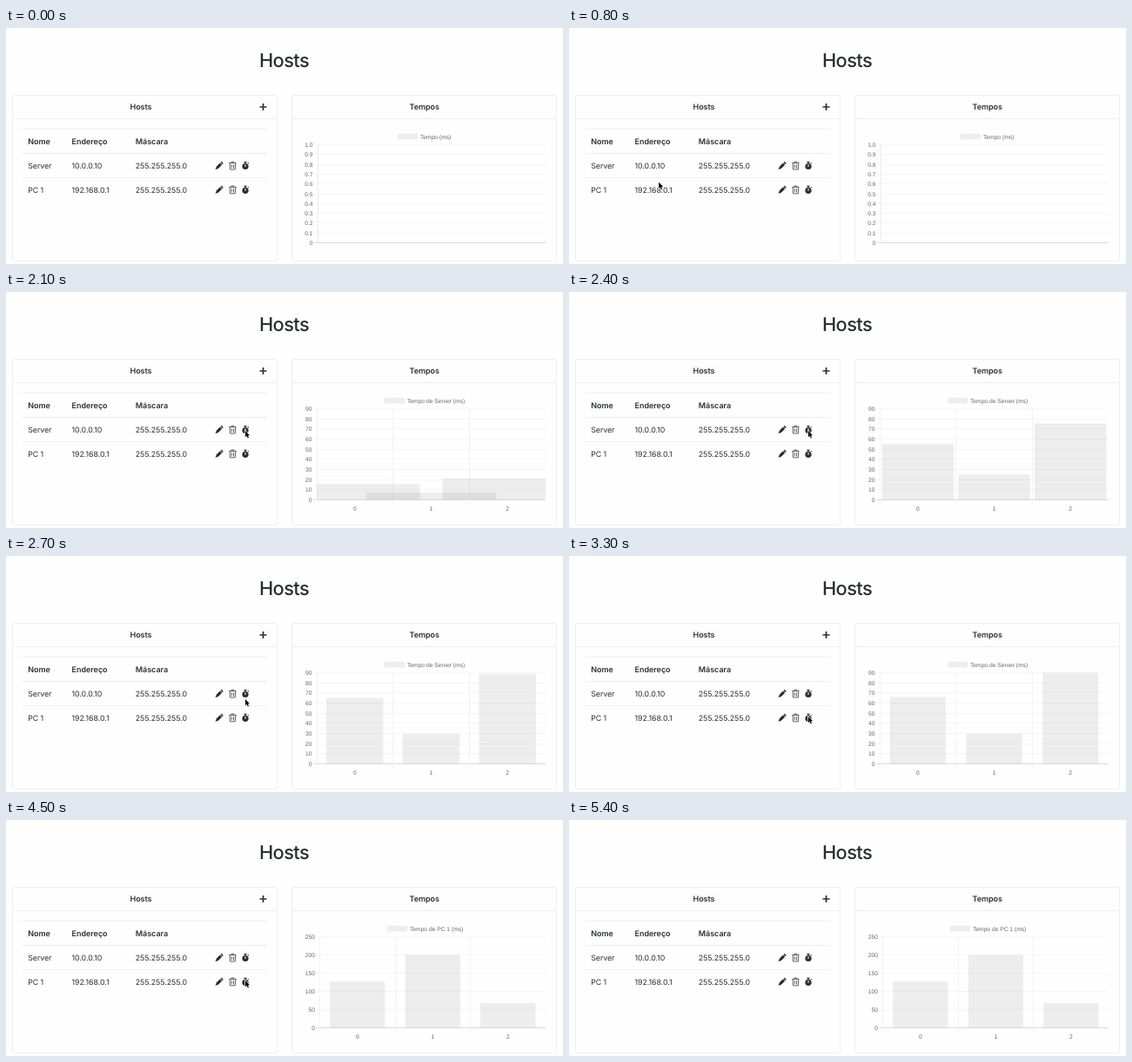
Animation of 640 by 272 pixels, one loop 5700 ms. Source, as an HTML page with a canvas:

```html
<!DOCTYPE html>
<html lang="pt">
<head>
<meta charset="utf-8">
<title>Hosts</title>
<style>
html, body { margin: 0; width: 100%; height: 100%; overflow: hidden; background: #fefefe; }
svg, canvas { position: absolute; left: 0; top: 0; width: 640px; height: 272px; }
text { font: 8.8px Inter, sans-serif; letter-spacing: -.04px; fill: #2b2f33; text-rendering: geometricPrecision; }
.b { font-size: 9px; font-weight: 600; letter-spacing: -.03px; }
.mid { text-anchor: middle; }
.h1 { font: 500 21.8px Inter, sans-serif; letter-spacing: -.6px; }
.line { fill: none; stroke: #eee; }
</style>
</head>
<body>
<svg id="page" viewBox="0 0 640 272">
  <defs>
    <g id="tools" fill="#2b2f33">
      <g transform="translate(244.8 .2) rotate(45)">
        <path d="M-1.6-3.2h3.2v5.6L0 6-1.6 2.4z"/>
        <rect x="-1.6" y="-5.6" width="3.2" height="1.7" rx=".6"/>
      </g>
      <path d="M256.2-3.1h8.4M259-3.3v-1.2h2.8v1.2M257.2-3l.3 7.3h5.8l.3-7.3M259.3-1.3v4M261.5-1.3v4"
        fill="none" stroke="#2b2f33" stroke-width=".75"/>
      <circle cx="275" cy=".8" r="3.6"/>
      <path d="M273.4-4.7h3.2v1.2h-1v1h-1.2v-1h-1zM277.5-2.8l.8-.8.9.9-.8.8z"/>
      <path d="M275-1.2v2.3" stroke="#fff" stroke-width="1.2"/>
    </g>
  </defs>
  <text class="h1 mid" x="319.5" y="44.7">Hosts</text>
  <rect class="line" x="7.5" y="77.5" width="304" height="191" rx="2"/>
  <rect class="line" x="328.5" y="77.5" width="304" height="191" rx="2"/>
  <path class="line" d="M8 104.5h303M329 104.5h303M19 116.5h281M19 144.5h281M19 172.5h281"/>
  <text class="b mid" x="155" y="94.3">Hosts</text>
  <text class="b mid" x="480.7" y="94.3">Tempos</text>
  <path d="M291.5 91h8M295.5 87v8" stroke="#2b2f33" stroke-width="1.7"/>
</svg>
<canvas id="stage"></canvas>
<script>
const LOOP = 5700, STEP = 100, GROW = 1000;
const RIGHT = 620, TOP = 134.5, GREY = 'rgba(0,0,0,.067)';
const ROW = 27.8;

const table = [
  ['Nome', 'Endereço', 'Máscara'],
  ['Server', '10.0.0.10', '255.255.255.0'],
  ['PC 1', '192.168.0.1', '255.255.255.0']
];
const columns = [25.2, 75.5, 148.8];

const charts = {
  empty: { left: 358, base: 247.5, max: 1, rows: 10, digits: 1, key: 450, label: 'Tempo (ms)', values: [], start: 0 },
  server: { left: 357, base: 239.5, max: 90, rows: 9, digits: 0, key: 435, label: 'Tempo de Server (ms)', values: [66, 30, 90], start: 2035 },
  pc: { left: 360.5, base: 239.5, max: 250, rows: 5, digits: 0, key: 438, label: 'Tempo de PC 1 (ms)', values: [127, 200, 68], start: 3635 }
};

// Pointer stops: time, x, y
const stops = [
  [100, 150, 233], [400, 82, 184], [500, 82, 184], [600, 43, 184], [1200, 275, 160],
  [2500, 275, 160], [3200, 275, 185], [5000, 275, 185], [5400, 334, 272]
];
const presses = [[1400, 160.5], [1900, 160.5], [3500, 187.5]];
const arrow = new Path2D('M0 0V7.2L1.6 5.8 2.8 8.5 4 8 2.9 5.4 5 5.2z');

const lerp = (a, b, p) => a + (b - a) * p;
const easeOutQuart = p => 1 - (1 - p) ** 4;
const smooth = p => p * p * (3 - 2 * p);
const crisp = v => Math.floor(v) + .5;

const canvas = document.getElementById('stage');
const ctx = canvas.getContext('2d');
const dpr = window.devicePixelRatio || 1;
canvas.width = 640 * dpr;
canvas.height = 272 * dpr;

function addNode(tag, attrs, content = '') {
  const node = document.createElementNS('http://www.w3.org/2000/svg', tag);
  for (const name in attrs) node.setAttribute(name, attrs[name]);
  node.textContent = content;
  document.getElementById('page').append(node);
}

function buildTable() {
  table.forEach((cells, r) => {
    const y = 134 + r * ROW;
    cells.forEach((cell, c) => addNode('text', { x: columns[c], y, class: r ? '' : 'b' }, cell));
    if (r) addNode('use', { href: '#tools', y: y - 3.1 });
  });
}

function line(x1, y1, x2, y2, color) {
  ctx.strokeStyle = color;
  ctx.lineWidth = 1;
  ctx.beginPath();
  ctx.moveTo(x1, y1);
  ctx.lineTo(x2, y2);
  ctx.stroke();
}

function label(str, x, y, align) {
  ctx.font = '6.7px "Liberation Sans", Arial, sans-serif';
  ctx.textRendering = 'geometricPrecision';
  ctx.fillStyle = '#666';
  ctx.textAlign = align;
  ctx.fillText(str, x, y);
}

function restBars(c) {
  const slot = (RIGHT - c.left) / 3;
  return c.values.map((v, i) => ({
    x: c.left + slot * (i + .5),
    w: slot * .73,
    y: lerp(c.base, TOP, v / c.max)
  }));
}

function drawAxes(c) {
  const axis = crisp(c.left);
  for (let i = 0; i <= c.rows; i++) {
    const y = crisp(lerp(c.base, TOP, i / c.rows));
    line(axis - 4, y, RIGHT, y, i ? '#f5f5f5' : '#dadada');
    label(i ? (c.max * i / c.rows).toFixed(c.digits) : '0', c.left - 5.5, y + 2.3, 'right');
  }
  line(axis, TOP, axis, c.base, '#ebebeb');
  ctx.fillStyle = GREY;
  ctx.fillRect(c.key, 122, 23, 6.5);
  label(c.label, c.key + 26, 127.6, 'left');
}

// Bars glide from their former shape; with none, they rise from the base
function drawBars(c, from, t) {
  const p = easeOutQuart(Math.min(1, (t - c.start) / GROW));
  ctx.save();
  ctx.beginPath();
  ctx.rect(c.left, TOP, RIGHT - c.left, c.base - TOP);
  ctx.clip();
  ctx.fillStyle = GREY;
  restBars(c).forEach((b, i) => {
    const a = from ? from[i] : { x: b.x, w: 176, y: c.base };
    const w = lerp(a.w, b.w, p), y = lerp(a.y, b.y, p);
    ctx.fillRect(lerp(a.x, b.x, p) - w / 2, y, w, c.base - y);
  });
  ctx.restore();
}

function drawChart(c, from, t) {
  drawAxes(c);
  const slot = (RIGHT - c.left) / 3;
  c.values.forEach((_, i) => {
    const x = crisp(c.left + slot * i);
    line(x, TOP, x, c.base + 5, '#f3f3f3');
    label(i, c.left + slot * (i + .5), 251.8, 'center');
  });
  drawBars(c, from, t);
}

function drawPointer(t) {
  const k = stops.findIndex(s => s[0] > t);
  if (k < 1) return;
  const [t0, x0, y0] = stops[k - 1], [t1, x1, y1] = stops[k];
  const p = smooth((t - t0) / (t1 - t0));
  ctx.save();
  ctx.translate(lerp(x0, x1, p), lerp(y0, y1, p));
  ctx.lineWidth = 1.2;
  ctx.strokeStyle = '#fff';
  ctx.stroke(arrow);
  ctx.fillStyle = '#000';
  ctx.fill(arrow);
  ctx.restore();
}

function drawPress(t) {
  for (const [at, y] of presses) {
    if (t < at || t >= at + STEP) continue;
    ctx.strokeStyle = GREY;
    ctx.lineWidth = 2;
    ctx.beginPath();
    ctx.roundRect(263, y - 11.5, 23, 23, 3);
    ctx.stroke();
  }
}

function draw(now) {
  const t = Math.floor(now % LOOP / STEP) * STEP;
  ctx.setTransform(dpr, 0, 0, dpr, 0, 0);
  ctx.clearRect(0, 0, 640, 272);
  if (t >= charts.pc.start) drawChart(charts.pc, restBars(charts.server), t);
  else if (t >= charts.server.start) drawChart(charts.server, null, t);
  else drawChart(charts.empty, null, t);
  drawPress(t);
  drawPointer(t);
}

let begin = null;
function tick(now) {
  if (begin === null) begin = now;
  draw(now - begin);
  requestAnimationFrame(tick);
}
buildTable();
draw(0);
requestAnimationFrame(tick);
</script>
</body>
</html>
```
